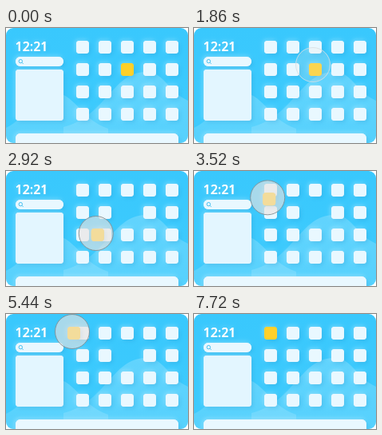
These frames come from a looping animation (228x144 px, 8.98 s). An HTML page with a canvas:

```html
<!DOCTYPE html>
<html lang="en">
<head>
<meta charset="utf-8">
<title>Home screen drag</title>
<style>
html, body { margin: 0; width: 100%; height: 100%; overflow: hidden; background: #fff; }
canvas { display: block; width: 228px; height: 144px; }
</style>
</head>
<body>
<canvas id="stage"></canvas>
<script>
const W = 228, H = 144, LOOP = 8980;
const ENTER = 1040, PRESS = 2020, HOVER = 3780, DROP = 6360, LEAVE = 7460, GONE = 7720;
const ICON = '#e9f8ff', YELLOW = '#ffd02a';

const canvas = document.getElementById('stage');
const ctx = canvas.getContext('2d');
const dpr = window.devicePixelRatio || 1;
canvas.width = W * dpr;
canvas.height = H * dpr;

const mix = (a, b, k) => a + (b - a) * k;
const progress = (t, from, to) => Math.min(1, Math.max(0, (t - from) / (to - from)));
const smooth = k => k * k * (3 - 2 * k);
const phase = (t, from, to) => smooth(progress(t, from, to));
const arc = (a, b, c, k) => mix(mix(a, b, k), mix(b, c, k), k);

// One curved drag, plus the slide in, a hesitation at the goal and the slide out.
function pointerAt(t) {
  const drag = phase(t, PRESS, HOVER);
  const inward = (1 - progress(t, ENTER, 1860)) ** 3;
  const outward = progress(t, LEAVE, GONE) ** 2;
  const right = phase(t, 3900, 4180), back = phase(t, 4400, 4800);
  const left = phase(t, 5280, 5440), home = phase(t, 5680, 5960);
  return [
    arc(149, 108, 90, drag) + 103 * inward + 162 * outward + 3 * right - 1.5 * back - 8.5 * left + 7 * home,
    arc(46, 123, 22, drag) + 38 * inward + 3 * outward - 1.5 * right + 1.5 * back
  ];
}

function shadow(color, blur, offset) {
  ctx.shadowColor = color;
  ctx.shadowBlur = blur * dpr;
  ctx.shadowOffsetX = ctx.shadowOffsetY = offset * dpr;
}

// Light from the upper left, shade to the lower right.
function raised(paint) {
  shadow('rgba(255,255,255,.28)', 5, -1.5);
  paint();
  shadow('rgba(0,115,185,.2)', 5, 2);
  paint();
  shadow('transparent', 0, 0);
}

function box(x, y, w, h, r, fill) {
  ctx.beginPath();
  ctx.roundRect(x, y, w, h, r);
  ctx.fillStyle = fill;
  raised(() => ctx.fill());
}

function gradient(top, bottom, from, to) {
  const g = ctx.createLinearGradient(0, top, 0, bottom);
  g.addColorStop(0, from);
  g.addColorStop(1, to);
  return g;
}

function hill(left, leftY, peak, peakY, right, rightY) {
  const rise = (peak - left) / 2, fall = (right - peak) / 2;
  ctx.beginPath();
  ctx.moveTo(left, H);
  ctx.lineTo(left, leftY);
  ctx.bezierCurveTo(left + rise, leftY - 12, peak - rise * 0.8, peakY, peak, peakY);
  ctx.bezierCurveTo(peak + fall * 0.9, peakY, right - fall, rightY - 12, right, rightY);
  ctx.lineTo(right, H);
  ctx.fillStyle = gradient(peakY, H, 'rgba(255,255,255,.2)', 'rgba(255,255,255,.12)');
  ctx.fill();
}

function drawBackground() {
  ctx.fillStyle = gradient(0, H, '#39c8fd', '#3ecbfd');
  ctx.fillRect(0, 0, W, H);
  hill(0, 125, 55, 80, 128, 126);
  hill(72, 124, 175, 55, W, 91);
}

function drawWidgets() {
  ctx.fillStyle = '#fff';
  ctx.font = '600 16px "Open Sans", "Noto Sans", sans-serif';
  raised(() => ctx.fillText('12:21', 11.5, 29));
  box(12, 36, 60, 12, 6, ICON);
  box(12, 52, 60, 64, 4, '#e3f6ff');
  box(12, 132, 204, 24, 6, ICON);
  ctx.strokeStyle = '#45bff0';
  ctx.lineWidth = 1;
  ctx.beginPath();
  ctx.arc(18.3, 41.6, 2.2, 0, Math.PI * 2);
  ctx.moveTo(20, 43.3);
  ctx.lineTo(21.6, 44.9);
  ctx.stroke();
}

const slot = n => [88 + n % 5 * 28, 16 + Math.floor(n / 5) * 28];

const drawIcon = (x, y, fill) => box(x, y, 16, 16, 4, fill);

// The first seven icons move one slot on to fill the gap left by the eighth.
function drawIcons(t) {
  const k = phase(t, DROP, DROP + 320);
  for (let n = 0; n < 20; n++) {
    if (n === 7) continue;
    const [x, y] = slot(n);
    const [nextX, nextY] = slot(n < 7 ? n + 1 : n);
    drawIcon(mix(x, nextX, k), mix(y, nextY, k), ICON);
  }
}

function drawDragged(t, px, py) {
  const lift = phase(t, PRESS, PRESS + 300);
  const drop = phase(t, DROP, DROP + 200);
  const [startX, startY] = slot(7), [endX, endY] = slot(0);
  const x = mix(startX, px - 6, lift), y = mix(startY, py - 6, lift);
  drawIcon(mix(x, endX, drop), mix(y, endY, drop), YELLOW);
}

function drawPointer(t, px, py) {
  if (t < ENTER || t >= GONE) return;
  const press = phase(t, PRESS, PRESS + 160) - phase(t, DROP, DROP + 200);
  const tone = mix(215, 130, press);
  ctx.beginPath();
  ctx.arc(px, py, 21.5, 0, Math.PI * 2);
  ctx.fillStyle = `rgba(236,228,224,${mix(0.2, 0.62, press)})`;
  ctx.fill();
  ctx.strokeStyle = `rgba(${tone},${tone + 8},${tone + 12},.85)`;
  ctx.lineWidth = 1;
  ctx.stroke();
}

function draw(t) {
  const [px, py] = pointerAt(t);
  ctx.setTransform(dpr, 0, 0, dpr, 0, 0);
  ctx.clearRect(0, 0, W, H);
  ctx.save();
  ctx.beginPath();
  ctx.roundRect(0, 0, W, H, 9);
  ctx.clip();
  drawBackground();
  drawWidgets();
  drawIcons(t);
  drawDragged(t, px, py);
  drawPointer(t, px, py);
  ctx.restore();
}

let start;
function tick(now) {
  start ??= now;
  draw((now - start) % LOOP);
  requestAnimationFrame(tick);
}
requestAnimationFrame(tick);
</script>
</body>
</html>
```
